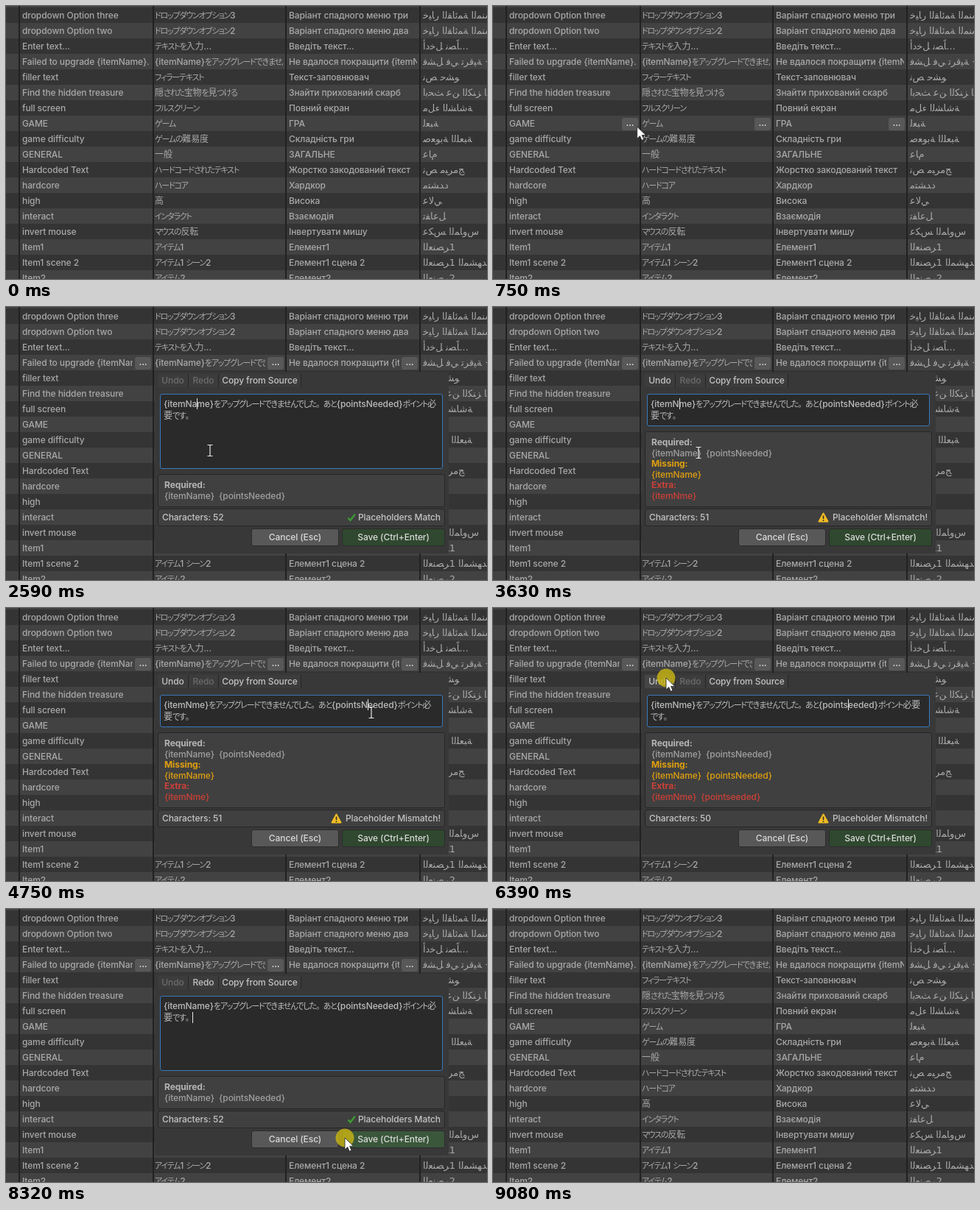
Recreate the animation shown at these times as an HTML page. Size 653 by 371 pixels, loop 9490 ms.

```html
<!DOCTYPE html>
<html lang="en">
<head>
<meta charset="utf-8">
<title>Translation table editor</title>
<style>
  html, body { margin: 0; width: 100%; height: 100%; overflow: hidden; background: #343434; }
  #stage {
    position: relative; width: 653px; height: 371px; overflow: hidden; cursor: default;
    font: 500 12px/16px Inter, "Noto Sans CJK JP", "Noto Sans", sans-serif;
    letter-spacing: -.09px; color: #c4c4c4;
  }
  #stage div, #stage svg { position: absolute; box-sizing: border-box; white-space: pre; }
  .row { left: 0; width: 653px; height: 21px; line-height: 21px; color: #a9a9a9; background: #343434; }
  .row.light { background: #424242; }
  .cell { top: 0; height: 21px; width: 174px; overflow: hidden; }
  .ar { font: 13px/21px "DejaVu Sans", sans-serif; direction: ltr; unicode-bidi: bidi-override; }
  .more {
    display: none; top: 3px; width: 22px; height: 17px; border-radius: 3px;
    background: #585858; color: #e4e4e4; font-weight: 600; line-height: 14px; text-align: center;
  }
  .hover .more { display: block; }
  .hover .cell { width: 150px; }
  .rule { top: 0; width: 2px; height: 371px; background: #212121; }
  .kana, .stop { font-style: normal; font-weight: 400; font-size: 11px; line-height: 0; letter-spacing: -1.2px; }
  .kana { font-feature-settings: "palt"; }
  #dialog { left: 202px; top: 88px; width: 399px; height: 247px; background: #383838; }
  .tool { top: 3px; height: 18px; line-height: 18px; text-align: center; background: #3c3c3c; border-right: 1px solid #262626; }
  .tool.off { color: #6c6c6c; }
  .tool.lit { background: #464646; }
  #field {
    left: 7px; top: 30px; width: 384px; padding: 5px 4px; border: 1px solid #3a79bb;
    border-radius: 3px; background: #2a2a2a; color: #bcbcbc;
  }
  .picked { background: #3b5f93; }
  .caret { position: absolute; width: 1px; height: 15px; background: #e8e8e8; }
  .box { left: 4px; width: 390px; border: 1px solid #262626; border-radius: 3px; background: #404040; }
  #report { padding: 7px 8px; line-height: 14.6px; color: #a0a0a0; }
  #report b { color: #b4b4b4; }
  #report .miss, #report .miss b { color: #e0a010; }
  #report .extra, #report .extra b { color: #cb4038; }
  .btn { top: 213px; height: 24px; line-height: 22px; border: 1px solid #2c2c2c; border-radius: 3px; text-align: center; color: #dadada; }
</style>
</head>
<body>
<div id="stage">
  <div id="table"></div>
  <div id="dialog">
    <div class="tool" id="undo" style="left:4px;width:42px">Undo</div>
    <div class="tool" id="redo" style="left:46px;width:41px">Redo</div>
    <div class="tool" id="copy" style="left:87px;width:112px">Copy from Source</div>
    <div id="field"></div>
    <div class="box" id="report"></div>
    <div class="box" style="top:186px;height:24px"></div>
    <div id="count" style="left:10px;top:190px"></div>
    <div id="verdict" style="right:11px;top:190px"></div>
    <svg id="tick" style="left:261px;top:192px" width="13" height="12">
      <path d="M1.5 6.5 4.5 9.8 10.8 1.8" fill="none" stroke="#3d9a35" stroke-width="2.4"/>
    </svg>
    <svg id="warn" style="left:239px;top:191px" width="15" height="14">
      <path d="M7.5 1.5 13.5 12.5H1.5Z" fill="#f2bd24" stroke="#f2bd24" stroke-width="2" stroke-linejoin="round"/>
      <path d="M7.5 4.5V9M7.5 10.3V12" stroke="#2b2b2b" stroke-width="1.6"/>
    </svg>
    <div class="btn" style="left:131px;width:119px;background:#585858">Cancel (Esc)</div>
    <div class="btn" id="save" style="left:254px;width:140px">Save (Ctrl+Enter)</div>
  </div>
  <svg id="pointer" style="left:0;top:0" width="653" height="371">
    <g id="mark">
      <circle id="press" r="12.5" fill="rgb(200,180,20)" fill-opacity=".82"/>
      <path id="arrow" d="M0 0V16L3.8 12.5 6.2 18.3 9 17.1 6.6 11.4H11.8Z" fill="#fff" stroke="#222" stroke-width=".8"/>
      <path id="beam" d="M-3.5-7.5H-1Q0-7.5 0-6.5V6.5Q0 7.5-1 7.5H-3.5M3.5-7.5H1Q0-7.5 0-6.5M0 6.5Q0 7.5 1 7.5H3.5" fill="none" stroke="#e6e6e6" stroke-width="1.2"/>
    </g>
  </svg>
</div>
<script>
const LOOP = 9490;
const $ = id => document.getElementById(id);
const within = (t, spans) => spans.some(([a, b]) => t >= a && t < b);
const show = (el, on) => { el.style.display = on ? '' : 'none'; };
const kana = s => s.replace(/[\u3040-\u30ff]+/g, '<i class="kana">$&</i>')
  .replace(/。/g, '<i class="stop">。</i>');

// Joining forms of each Arabic letter: isolated, final, initial, medial.
const forms = {};
for (let code = 0xFE80; code <= 0xFEF4; code++) {
  const glyph = String.fromCharCode(code);
  (forms[glyph.normalize('NFKC')] ??= []).push(glyph);
}

// The table sets shaped Arabic letters from left to right.
const arabic = s => [...s].map((ch, i, all) => {
  const f = forms[ch];
  if (!f) return ch;
  const before = f.length > 1 && forms[all[i - 1]]?.length === 4;
  const after = f.length === 4 && forms[all[i + 1]]?.length > 1;
  return f[before + 2 * after];
}).join('');

const rows = `dropdown Option three|ドロップダウンオプション3|Варіант спадного меню три|خيار القائمة المنسدلة
dropdown Option two|ドロップダウンオプション2|Варіант спадного меню два|خيار القائمة المنسدلة
Enter text...|テキストを入力...|Введіть текст...|أدخل نصاً...
Failed to upgrade {itemName}.|{itemName}をアップグレードできませんでした。|Не вдалося покращити {itemName}|فشل في ترقية {itemName}
filler text|フィラーテキスト|Текст-заповнювач|نص حشو
Find the hidden treasure|隠された宝物を見つける|Знайти прихований скарб|ابحث عن الكنز المخفي
full screen|フルスクリーン|Повний екран|ملء الشاشة
GAME|ゲーム|ГРА|لعبة
game difficulty|ゲームの難易度|Складність гри|صعوبة اللعبة
GENERAL|一般|ЗАГАЛЬНЕ|عام
Hardcoded Text|ハードコードされたテキスト|Жорстко закодований текст|نص مبرمج
hardcore|ハードコア|Хардкор|متشدد
high|高|Висока|عالي
interact|インタラクト|Взаємодія|تفاعل
invert mouse|マウスの反転|Інвертувати мишу|عكس الماوس
Item1|アイテム1|Елемент1|العنصر1
Item1 scene 2|アイテム1 シーン2|Елемент1 сцена 2|العنصر1 المشهد 2
Item2|アイテム2|Елемент2|العنصر2`.split('\n').map(r => r.split('|'));

const rowTop = i => 2 + 21 * i;
const cellX = [22, 202, 384, 566];
const buttonX = [175, 355, 537];

const cell = (s, c) => c === 3
  ? `<div class="cell ar" style="left:${cellX[c]}px">${arabic(s)}</div>`
  : `<div class="cell" style="left:${cellX[c]}px">${kana(s)}</div>`;

$('table').innerHTML =
  `<div class="row light" style="top:${rowTop(-1)}px"></div>` +
  rows.map((cells, i) =>
    `<div class="row ${i % 2 ? 'light' : ''}" style="top:${rowTop(i)}px">` +
    cells.map(cell).join('') +
    buttonX.map(x => `<div class="more" style="left:${x}px">...</div>`).join('') + '</div>').join('') +
  [17, 199, 379, 561].map(x => `<div class="rule" style="left:${x}px"></div>`).join('');
const rowEls = [...document.querySelectorAll('.row')].slice(1);

// Editor text, with | as the caret; each entry holds until the next.
const mid = 'をアップグレードできませんでした。あと';
const edits = [
  { t: 0, text: `{itemName}${mid}{pointsNeeded}ポイント必\n要です。`, count: 52, picked: true },
  { t: 2090, text: `{itemNa|me}${mid}{pointsNeeded}ポイント必\n要です。`, count: 52 },
  { t: 2950, text: `{itemN|me}${mid}{pointsNeeded}ポイント必\n要です。`, count: 51, undo: true,
    missing: '{itemName}', extra: '{itemNme}' },
  { t: 4550, text: `{itemNme}${mid}{pointsN|eeded}ポイント必\n要です。`, count: 51, undo: true,
    missing: '{itemName}', extra: '{itemNme}' },
  { t: 4800, text: `{itemNme}${mid}{points|eeded}ポイント必要\nです。`, count: 50, undo: true,
    missing: '{itemName}  {pointsNeeded}', extra: '{itemNme}  {pointseeded}' },
  { t: 6440, text: `{itemNme}${mid}{pointsN|eeded}ポイント必\n要です。`, count: 51, undo: true, redo: true,
    missing: '{itemName}', extra: '{itemNme}' },
  { t: 6900, text: `{itemName}${mid}{pointsNeeded}ポイント必\n要です。|`, count: 52, redo: true },
];

// Pointer moves: start, end, from, to, optional bend point.
const moves = [
  [200, 1120, [100, 318], [248, 80]],
  [1570, 1920, [248, 80], [261, 128], [345, 95]],
  [2340, 2590, [261, 128], [277, 195]],
  [3530, 3580, [277, 195], [282, 205]],
  [3580, 3630, [282, 205], [279, 198]],
  [3830, 4500, [279, 198], [502, 146], [400, 195]],
  [4500, 4550, [502, 146], [496, 142]],
  [5520, 5990, [496, 142], [202, 110], [330, 185]],
  [6140, 6340, [202, 110], [235, 95]],
  [6440, 6490, [235, 95], [235, 98]],
  [7350, 8220, [235, 98], [460, 311], [260, 150]],
  [8670, 8670, [460, 311], [562, 326]],
  [8820, 9080, [562, 326], [542, 392]],
];
const presses = [[1270, 1370], [6340, 6490], [6800, 7000], [7650, 7850], [8320, 8420]];

function pointerAt(t) {
  const m = moves.filter(m => m[0] <= t).pop() || moves[0];
  const [t0, t1, from, to, bend] = m;
  const p = t >= t1 ? 1 : Math.max(0, (t - t0) / (t1 - t0));
  const e = p * p * (3 - 2 * p);
  return from.map((a, i) => {
    const c = bend ? bend[i] : (a + to[i]) / 2;
    return (1 - e) ** 2 * a + 2 * e * (1 - e) * c + e * e * to[i];
  });
}

function hoveredRow(t, y) {
  if (t < 200 || t >= 9030) return -1;
  if (t >= 1120 && t < 8370) return 3;
  if (t >= 8370 && t < 8820) return 14;
  return Math.floor((y - rowTop(0)) / 21);
}

let shown;
function showEdit(s) {
  if (s === shown) return;
  shown = s;
  const html = kana(s.text).replace('|', '<span class="caret"></span>');
  $('field').innerHTML = s.picked ? `<span class="picked">${html}</span>` : html;
  $('field').style.height = (s.missing ? 44 : 102) + 'px';
  $('report').style.top = (s.missing ? 81 : 139) + 'px';
  $('report').style.height = (s.missing ? 103 : 45) + 'px';
  $('report').innerHTML = '<b>Required:</b>\n{itemName}  {pointsNeeded}' + (s.missing
    ? `\n<span class="miss"><b>Missing:</b>\n${s.missing}</span>\n<span class="extra"><b>Extra:</b>\n${s.extra}</span>` : '');
  $('count').textContent = 'Characters: ' + s.count;
  $('verdict').textContent = s.missing ? 'Placeholder Mismatch!' : 'Placeholders Match';
  show($('tick'), !s.missing);
  show($('warn'), s.missing);
  $('undo').classList.toggle('off', !s.undo);
  $('redo').classList.toggle('off', !s.redo);
}

function render(t) {
  const [x, y] = pointerAt(t);
  const row = hoveredRow(t, y);
  rowEls.forEach((el, i) => el.classList.toggle('hover', i === row));

  show($('dialog'), within(t, [[1270, 8370]]));
  showEdit(edits.filter(s => s.t <= t).pop());
  const onBar = y > 91 && y < 109;
  $('copy').classList.toggle('lit', onBar && x > 289 && x < 400);
  $('undo').classList.toggle('lit', onBar && x > 206 && x < 247 && !!shown.undo);
  $('save').style.background = x > 456 && x < 596 && y > 301 ? '#3a573b' : '#2f482f';

  const beam = within(t, [[1870, 5930]]);
  show($('mark'), within(t, [[200, 9080]]));
  show($('press'), within(t, presses));
  show($('beam'), beam);
  show($('arrow'), !beam);
  $('mark').setAttribute('transform', `translate(${x.toFixed(2)} ${y.toFixed(2)})`);
}

const start = performance.now();
function tick() {
  render((performance.now() - start) % LOOP);
  requestAnimationFrame(tick);
}
tick();
</script>
</body>
</html>
```
